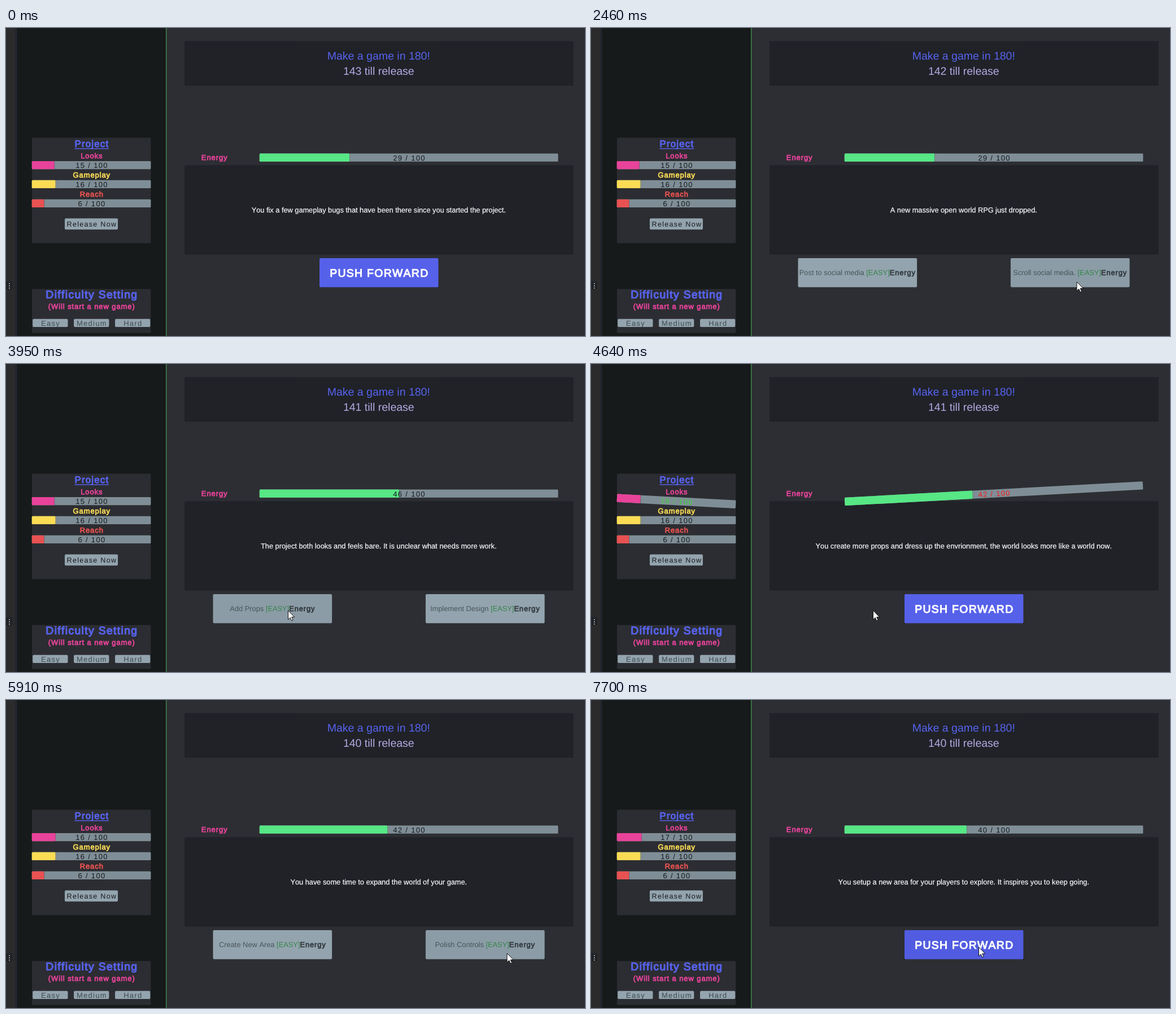
An HTML page for the animation above (8000 ms loop, 1025 px wide and 546 px high).

```html
<!DOCTYPE html>
<html lang="en">
<head>
<meta charset="utf-8">
<title>Make a game in 180</title>
<style>
  html, body { margin: 0; width: 100%; height: 100%; overflow: hidden; background: #2d2e33; }
  svg { display: block; }
  text {
    font-family: "Liberation Sans", Arial, sans-serif;
    font-kerning: none;
    text-rendering: geometricPrecision;
    text-anchor: middle;
    fill: currentColor;
    white-space: pre;
  }
  .bold { letter-spacing: .07em; stroke: currentColor; stroke-width: .06em; }
  .wide { letter-spacing: .1em; }
  .firm { stroke: currentColor; stroke-width: .02em; }
  .easy { fill: #37854b; }
  .cost { fill: #343b40; color: #343b40; }
</style>
</head>
<body>
<svg id="stage" width="1025" height="546" viewBox="0 0 1025 546"></svg>
<script>
const NS = 'http://www.w3.org/2000/svg';
const stage = document.getElementById('stage');
const PINK = '#e8439a', BLUE = '#5763ee', GREY = '#93a4ae', GREY_HOVER = '#8b9ca6';
const INK = '#15181b', GAIN = '#3ad63a', LOSS = '#f41a1a';
const LOOP = 8000, SHAKE = 500;

function add(tag, attrs, parent = stage) {
  const el = document.createElementNS(NS, tag);
  for (const k in attrs) el.setAttribute(k, attrs[k]);
  return parent.appendChild(el);
}

const rect = (x, y, width, height, fill, rx = 0, parent) =>
  add('rect', { x, y, width, height, fill, rx }, parent);

// Centred text; letter spacing trails the last glyph, so shift by half of it.
function label(str, x, y, size, color, cls = '', parent) {
  const gap = cls === 'bold' ? .07 : cls === 'wide' ? .1 : 0;
  const el = add('text', { x: x + size * gap / 2, y, 'font-size': size, color, class: cls }, parent);
  el.textContent = str;
  return el;
}

function makeBar(x, y, width, color, base, unit) {
  const g = add('g', {});
  const cx = x + width / 2;
  rect(x, y, width, 14.3, '#7f8e96', 1.5, g);
  const fill = rect(x, y, 0, 14.3, color, 1.5, g);
  const edge = rect(x, y, .8, 14.3, 'rgba(0,0,0,.25)', 0, g);
  const text = label('', cx + .3, y + 12.1, 13, INK, 'wide', g);
  return (value, angle = 0, ink = INK) => {
    const w = base + unit * value;
    fill.setAttribute('width', w);
    edge.setAttribute('x', x + w - .4);
    text.textContent = value + ' / 100';
    text.setAttribute('color', ink);
    g.setAttribute('transform', `rotate(${angle} ${cx} ${y + 7})`);
  };
}

function makeChoice(x) {
  const g = add('g', {});
  const box = rect(x, 408, 210.6, 51.5, GREY, 2, g);
  const text = label('', x + 105.3, 438, 12.85, '#4a545a', '', g);
  const name = add('tspan', {}, text);
  add('tspan', { class: 'easy' }, text).textContent = '[EASY]';
  add('tspan', { class: 'cost bold' }, text).textContent = 'Energy';
  return { x, g, box, name };
}

// Backdrop and side strip
rect(0, 0, 1025, 546, '#2d2e33');
rect(0, 0, 16.5, 546, '#2b2b2c');
rect(16.5, 0, 3, 546, '#1c2129');
rect(17.6, 0, 1, 546, '#2a2f37');
rect(19.5, 0, 263.5, 546, '#161a1a');
rect(283, 0, 1.4, 546, '#3f8c4e');
rect(0, 449, 11, 14, '#1f2226');
for (const y of [453, 457, 461]) add('circle', { cx: 6, cy: y, r: .95, fill: '#d0d0d0' });

// Project panel
rect(46, 194.5, 210.3, 187, '#2c2d32', 2);
label('Project', 151.3, 211.4, 16.9, BLUE, 'bold');
rect(121.2, 213.2, 61, 1.4, BLUE);
label('Looks', 151.3, 231, 13, PINK, 'bold');
label('Gameplay', 151.3, 264.8, 13, '#fbdc55', 'bold');
label('Reach', 151.3, 298.6, 13, '#e85252', 'bold');
const looks = makeBar(45.8, 236, 210.6, PINK, 9.6, 2.02);
makeBar(45.8, 269.8, 210.6, '#fbdc55', 9.6, 2.02)(16);
makeBar(45.8, 303.7, 210.6, '#e85252', 9.6, 2.02)(6);
rect(104, 337.5, 94, 19.7, GREY, 2);
label('Release Now', 151.3, 352.2, 12.6, INK, 'wide');

// Difficulty panel
rect(46, 462.8, 210.3, 78, '#2c2d32', 2);
label('Difficulty Setting', 151.2, 479.4, 19.35, BLUE, 'bold');
label('(Will start a new game)', 151.3, 498, 13, PINK, 'bold');
['Easy', 'Medium', 'Hard'].forEach((s, i) => {
  const x = 47.2 + 72.9 * i;
  rect(x, 515.7, 62.3, 14.4, GREY, 2);
  label(s, x + 31.2, 527.6, 13, '#3f484e', 'wide');
});

// Main area
rect(316, 23.3, 688.6, 78.9, '#202228', 2);
label('Make a game in 180!', 659.8, 56.4, 19.5, BLUE);
const days = label('', 659.8, 82.8, 19.5, '#b4a7e0');
label('Energy', 368.7, 234.2, 13, PINK, 'bold');
rect(316, 243.2, 688.6, 158.6, '#202228', 2);
const story = label('', 659.8, 327.2, 12.76, '#f4f4f5', 'firm');
const energy = makeBar(448.8, 222.5, 528.6, '#57e785', 9.2, 5.18);

const push = add('g', {});
const pushBox = rect(555, 408, 210.4, 51.5, BLUE, 2, push);
label('PUSH FORWARD', 660.2, 440.9, 19.35, '#fafaff', 'bold', push);
const choices = [makeChoice(366.5), makeChoice(742.9)];

const pointer = add('path', {
  d: 'M0 0V16L3.7 12.6L6.1 18L8.6 16.9L6.2 11.7H11.3Z',
  fill: '#fff', stroke: '#111', 'stroke-width': 1
});

const scenes = [
  { at: 0, days: 143, energy: 29, looks: 15,
    story: 'You fix a few gameplay bugs that have been there since you started the project.' },
  { at: 1990, days: 142, energy: 29, looks: 15,
    story: 'A new massive open world RPG just dropped.',
    options: ['Post to social media ', 'Scroll social media. '] },
  { at: 2660, days: 142, energy: 46, looks: 15, swing: 4.35, ink: GAIN,
    story: 'You scroll for a while and feel rested enough to carry on.' },
  { at: 3550, days: 141, energy: 46, looks: 15,
    story: 'The project both looks and feels bare. It is unclear what needs more work.',
    options: ['Add Props ', 'Implement Design '] },
  { at: 4450, days: 141, energy: 42, looks: 16, swing: 5, ink: LOSS, better: true,
    story: 'You create more props and dress up the envrionment, the world looks more like a world now.' },
  { at: 5580, days: 140, energy: 42, looks: 16,
    story: 'You have some time to expand the world of your game.',
    options: ['Create New Area ', 'Polish Controls '] },
  { at: 6880, days: 140, energy: 40, looks: 17, swing: 5, ink: LOSS, better: true,
    story: 'You setup a new area for your players to explore. It inspires you to keep going.' }
];

// Pointer moves: start, end, target x, target y
const moves = [
  [360, 810, 697, 441.5],
  [2280, 2460, 860, 450],
  [3000, 3350, 690, 441.5],
  [3650, 3950, 499.5, 437],
  [4740, 5000, 645.5, 443.5],
  [5000, 5250, 668, 442],
  [5640, 5910, 887, 449],
  [6270, 6390, 472.5, 444],
  [7270, 7670, 685, 438],
  [7690, 7700, 686.5, 438]
];

const ease = u => u * u * (3 - 2 * u);

function pointerAt(t) {
  let x = 803, y = 548;
  for (const [from, to, tx, ty] of moves) {
    if (t < from) break;
    const k = ease(Math.min(1, (t - from) / (to - from)));
    x += (tx - x) * k;
    y += (ty - y) * k;
  }
  return [x, y];
}

let current;
function show(scene) {
  if (scene === current) return;
  current = scene;
  days.textContent = scene.days + ' till release';
  story.textContent = scene.story;
  push.style.display = scene.options ? 'none' : '';
  choices.forEach((c, i) => {
    c.g.style.display = scene.options ? '' : 'none';
    if (scene.options) c.name.textContent = scene.options[i];
  });
}

function draw(now) {
  const t = now % LOOP;
  const scene = scenes.findLast(s => t >= s.at);
  show(scene);

  const age = t - scene.at;
  const shaking = scene.swing && age < SHAKE;
  const angle = shaking ? scene.swing * (1 - age / SHAKE) * Math.sin(2 * Math.PI * age / 109) : 0;
  energy(scene.energy, angle, shaking ? scene.ink : INK);
  const grown = shaking && scene.better;
  looks(scene.looks, grown ? -angle : 0, grown ? GAIN : INK);

  const [x, y] = pointerAt(t);
  pointer.setAttribute('transform', `translate(${x} ${y})`);
  pointer.style.display = t < 360 ? 'none' : '';
  const over = left => y > 408 && y < 459.5 && x > left && x < left + 210.6;
  const hot = over(555) && t >= 1270;
  pushBox.setAttribute('fill', !hot ? '#5661ea' : t < 1300 ? '#535ee5' : '#515ce0');
  for (const c of choices) c.box.setAttribute('fill', over(c.x) ? GREY_HOVER : GREY);
}

const start = performance.now();
function tick() {
  draw(performance.now() - start);
  requestAnimationFrame(tick);
}
tick();
</script>
</body>
</html>
```
